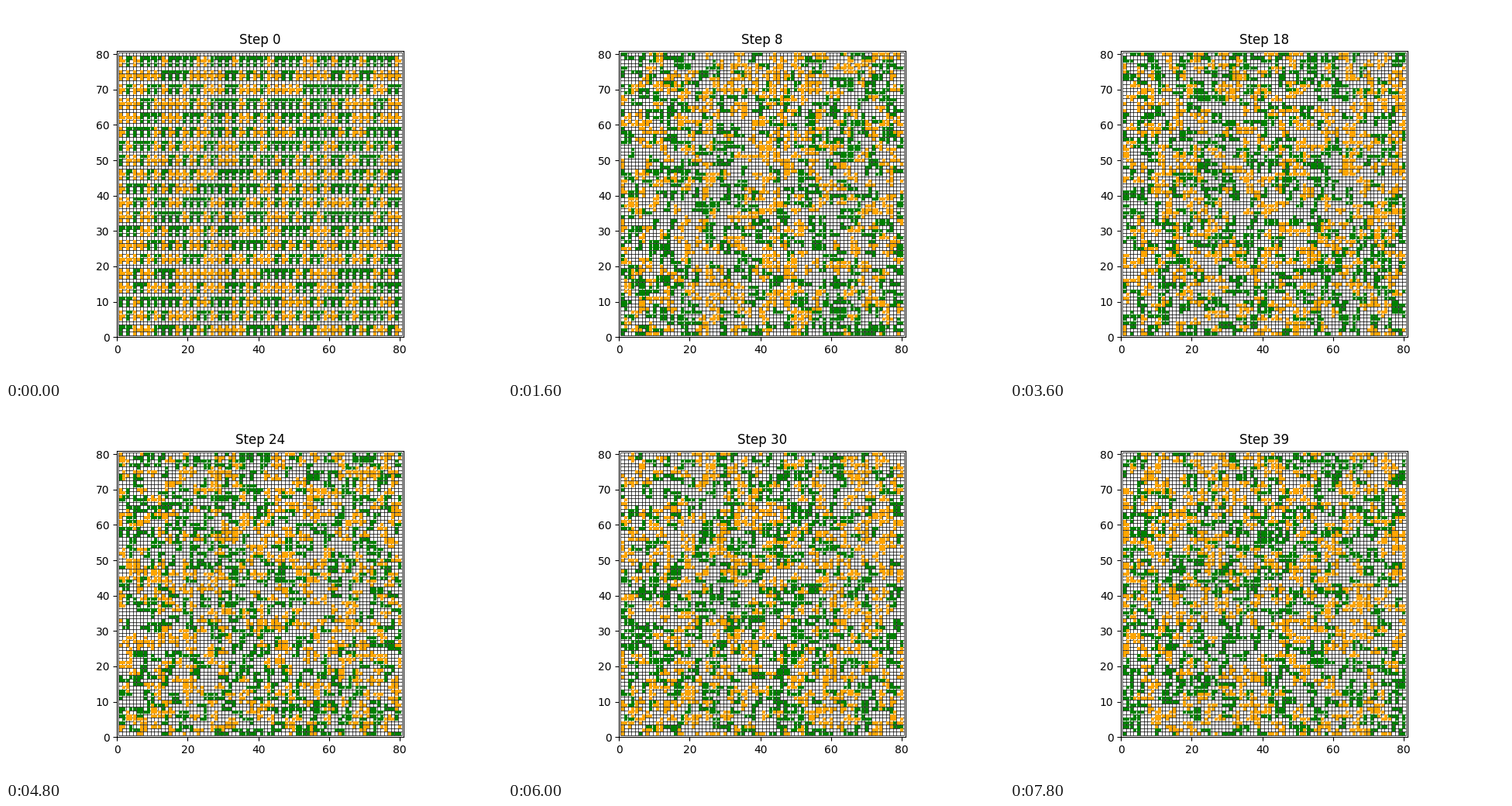
Recreate the animation shown at these times as a matplotlib script. Size 640 by 480 pixels, loop 8 s.

```python
import random

import matplotlib.pyplot as plt
import numpy as np
from matplotlib.animation import FuncAnimation

SIZE = 80
STEPS = 40
TRIES = 40
COLORS = ("green", "orange")
# Tetrominoes as (x, y) offsets: an L and a T, both two wide and three tall
SHAPES = (
    ((0, 0), (0, 1), (0, 2), (1, 2)),
    ((0, 0), (0, 1), (0, 2), (1, 1)),
)

rng = random.Random(7)


def turns(shape):
    """The four quarter turns of a shape."""
    out = []
    for _ in range(4):
        out.append(shape)
        shape = tuple((-y, x) for x, y in shape)
    return out


TURNED = [turns(s) for s in SHAPES]


def place(kind, turn, x, y):
    return [((x + dx) % SIZE, (y + dy) % SIZE) for dx, dy in TURNED[kind][turn]]


def start():
    """Upright pieces packed in rows, kinds chosen at random."""
    pieces = []
    for y in range(SIZE - 4, -1, -4):
        for x in range(0, SIZE, 2):
            kind = rng.randrange(2)
            pieces.append((kind, place(kind, 0, x, y)))
    return pieces


def sweep(pieces, taken):
    """Lift each piece and drop it, turned, on a random free spot."""
    for i in rng.sample(range(len(pieces)), len(pieces)):
        kind, cells = pieces[i]
        taken.difference_update(cells)
        for _ in range(TRIES):
            new = place(kind, int(rng.random() * 4),
                        int(rng.random() * SIZE), int(rng.random() * SIZE))
            if taken.isdisjoint(new):
                cells = new
                break
        taken.update(cells)
        pieces[i] = (kind, cells)


def snapshot(pieces):
    """Cell centres for each kind."""
    return [np.array([c for k, cells in pieces if k == kind for c in cells]) + 1
            for kind in range(2)]


def simulate():
    pieces = start()
    taken = {c for _, cells in pieces for c in cells}
    states = [snapshot(pieces)]
    for _ in range(STEPS - 1):
        sweep(pieces, taken)
        states.append(snapshot(pieces))
    return states


states = simulate()

fig, ax = plt.subplots(figsize=(6.4, 4.8), dpi=100)
ax.set_aspect("equal")
ax.set_xlim(0, SIZE + 1)
ax.set_ylim(0, SIZE + 1)
ax.set_xticks(range(0, SIZE + 1, 20))
ax.set_yticks(range(0, SIZE + 1, 10))

# Grid lines stop at the outer cells, short of the frame
edges = np.arange(SIZE + 1) + 0.5
for lines in (ax.vlines, ax.hlines):
    lines(edges, edges[0], edges[-1], colors="black", linewidth=0.5, zorder=1)

marks = [ax.plot([], [], "s", color=c, markersize=2.88, markeredgewidth=0)[0]
         for c in COLORS]
title = ax.set_title("Step 0")


def update(step):
    for mark, cells in zip(marks, states[step]):
        mark.set_data(cells[:, 0], cells[:, 1])
    title.set_text(f"Step {step}")
    return [*marks, title]


anim = FuncAnimation(fig, update, frames=STEPS, interval=200,
                     repeat=True, repeat_delay=0, blit=False)
plt.show()
```
